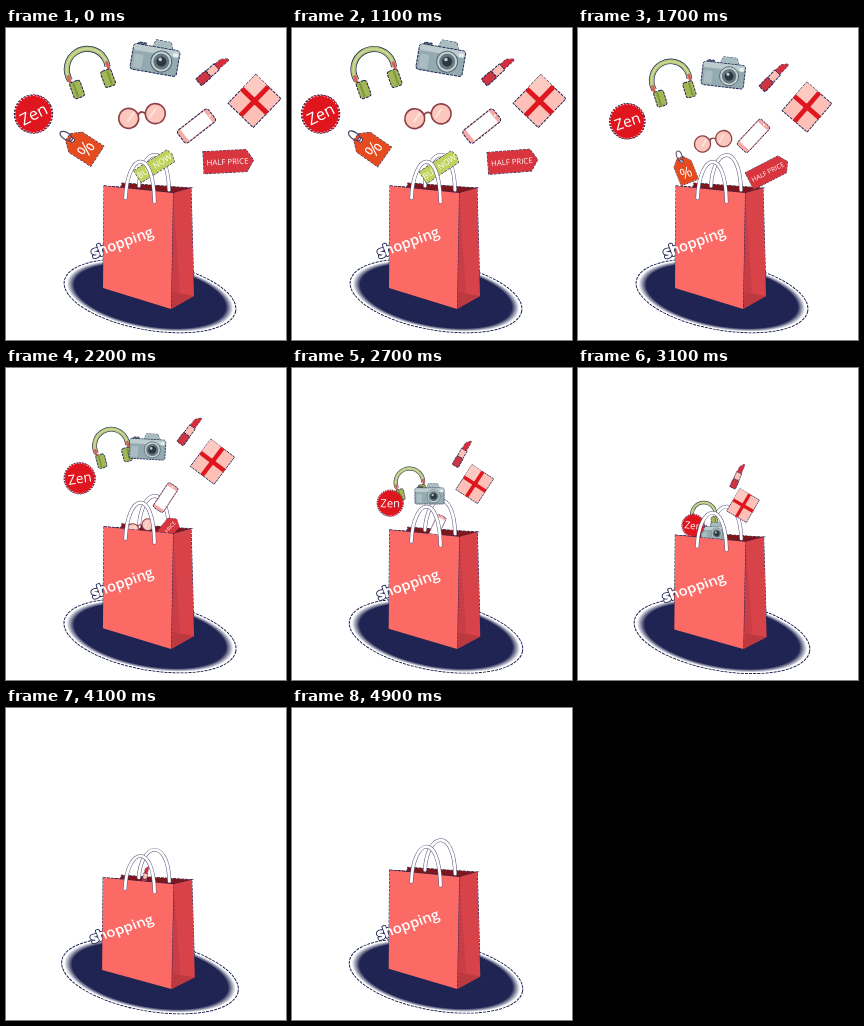
An HTML page with a canvas for the animation above (5 s loop, 280 by 312 pixels).

```html
<!DOCTYPE html>
<html lang="en">
<head>
<meta charset="utf-8">
<title>Shopping bag</title>
<style>
  html, body { margin: 0; width: 100%; height: 100%; overflow: hidden; background: #fff; }
  canvas { display: block; }
</style>
</head>
<body>
<canvas id="stage" width="280" height="312"></canvas>
<script>
const ctx = document.getElementById('stage').getContext('2d');
const FONT = '"Open Sans", "Noto Sans", sans-serif';
const NAVY = '#1f2452', RED = '#e0161f', PINK = '#fdbfb6', WHITE = '#fff';
const LOOP = 5000, HOLD = 1000, STEP = 100;
const MOUTH = { x: 134, y: 195 };

const rad = deg => deg * Math.PI / 180;
const mix = (a, b, u) => a + (b - a) * u;
const smooth = u => u * u * (3 - 2 * u);
const bump = (k, center, width) => Math.exp(-(((k - center) / width) ** 2));

function paint(fill, edge) {
  if (fill) {
    ctx.fillStyle = fill;
    ctx.fill();
  }
  if (edge) {
    ctx.strokeStyle = edge;
    ctx.stroke();
  }
}

function dashedEdge() {
  ctx.lineWidth = 1;
  ctx.setLineDash([3, 1]);
  paint(null, NAVY);
  ctx.setLineDash([]);
}

function poly(points, fill, outlined) {
  ctx.beginPath();
  points.forEach(([x, y]) => ctx.lineTo(x, y));
  ctx.closePath();
  if (outlined) dashedEdge();
  paint(fill);
}

function box(x, y, w, h, r, fill, outlined) {
  ctx.beginPath();
  ctx.roundRect(x, y, w, h, r);
  paint(fill);
  if (outlined) dashedEdge();
}

function disc(x, y, r, fill, edge, width = 1) {
  ctx.beginPath();
  ctx.arc(x, y, r, 0, 2 * Math.PI);
  ctx.lineWidth = width;
  paint(fill, edge);
}

function label(text, size, y, weight = 400) {
  ctx.font = `${weight} ${size}px ${FONT}`;
  ctx.textAlign = 'center';
  ctx.textBaseline = 'alphabetic';
  ctx.fillStyle = WHITE;
  ctx.fillText(text, 0, y);
}

function headphones() {
  ctx.lineCap = 'butt';
  for (const [color, width] of [[NAVY, 6], ['#b4c578', 4.6], ['#d3dca0', 1.4]]) {
    ctx.beginPath();
    ctx.arc(0, -5, 20.5, 0.93 * Math.PI, 2.07 * Math.PI);
    ctx.lineWidth = width;
    paint(null, color);
  }
  for (const side of [-1, 1]) {
    ctx.save();
    ctx.scale(side, 1);
    box(19, -6, 3, 10, 1, '#d4605a');
    box(11, 2, 11, 17, 2.5, '#a3b755', true);
    box(17, 3, 2, 15, 1, '#7f9440');
    ctx.restore();
  }
}

function camera() {
  box(-19, -12, 8, 5, 1, '#5d737c', true);
  poly([[-5, -9], [-2, -17], [13, -17], [16, -9]], '#a9bdc1', true);
  box(-23.5, -10, 47, 26, 3, '#93aab0', true);
  box(-23, -9.5, 46, 6, 2, '#bccccf');
  box(-21, 0, 9, 14, 1, '#a9bcc0');
  box(17, -7, 5, 4, 1, '#e4eeee');
  disc(6.5, 3.5, 10.5, '#c6d2d4', '#566870');
  disc(6.5, 3.5, 8, '#66787f');
  disc(6.5, 3.5, 5, '#2c3840');
  disc(5, 1.5, 1.8, '#b9cdd1');
}

function lipstick() {
  box(-4.5, 6, 9, 13, 1, '#cf3540', true);
  box(-4, -5, 8, 11, 0, PINK, true);
  poly([[-3, -5], [-3, -13], [2, -19], [3, -17], [3, -5]], '#d92c3a', true);
}

function gift() {
  box(-17.5, -20, 35, 40, 0, PINK, true);
  box(-17.5, -20, 17, 20, 0, '#fccac1');
  box(-2.5, -20, 5, 40, 0, RED);
  box(-17.5, -2.5, 35, 5, 0, RED);
  disc(0, 0, 3.5, RED);
}

function badge() {
  disc(0, 0, 18, RED);
  ctx.setLineDash([2, 1.4]);
  disc(0, 0, 18.3, null, RED, 2);
  disc(0, 0, 19.2, null, NAVY, 1);
  ctx.setLineDash([]);
  label('Zen', 16.5, 6, 500);
}

function priceTag() {
  poly([[-4, -18], [4, -18], [12, -9], [12, 17], [-12, 17], [-12, -9]], '#e64b1f', true);
  disc(0, -13, 2.3, WHITE, NAVY, 0.8);
  ctx.beginPath();
  ctx.ellipse(0, -20, 3.5, 7, 0, 0, 2 * Math.PI);
  ctx.lineWidth = 1.3;
  paint(null, '#55476a');
  label('%', 19, 10, 500);
}

function glasses() {
  const frame = '#8d3f47';
  ctx.beginPath();
  ctx.arc(0, 0, 4, 1.1 * Math.PI, 1.9 * Math.PI);
  ctx.lineWidth = 1.8;
  paint(null, frame);
  for (const side of [-1, 1]) {
    disc(side * 13.5, 0, 10, '#fcc7bd', frame, 1.6);
    ctx.beginPath();
    ctx.moveTo(side * 11 - 4, 3);
    ctx.lineTo(side * 11 + 4, -5);
    ctx.lineWidth = 2;
    paint(null, '#fee2dc');
  }
}

function phone() {
  box(-19.5, -8, 39, 16, 3, '#f5a9a2', true);
  box(-15, -7, 30, 14, 0, WHITE);
  disc(17, 0, 1, WHITE);
}

function halfPrice() {
  poly([[-24, -11], [19, -11], [26, 0], [19, 11], [-24, 11]], '#d8353e', true);
  label('HALF PRICE', 7.8, 3);
}

function buyNow() {
  poly([[-20, -7], [19, -7], [21, 0], [19, 7], [-20, 7]], '#bfd35c', true);
  label('BUY NOW', 8.4, 3);
}

// Resting pose, final angle and number of steps to the bag; back to front.
const items = [
  { draw: headphones, x: 83, y: 46, from: -20, to: -8, steps: 29 },
  { draw: phone, x: 190.5, y: 98, from: -38, to: -72, steps: 25 },
  { draw: glasses, x: 136, y: 88, from: -10, to: -20, steps: 17 },
  { draw: camera, x: 149.5, y: 29, from: 10, to: -3, steps: 26 },
  { draw: lipstick, x: 207, y: 42, from: 49, to: 10, steps: 38 },
  { draw: gift, x: 248.5, y: 73, from: 44, to: 25, steps: 34 },
  { draw: badge, x: 27.5, y: 86, from: -27, to: 15, steps: 30 },
  { draw: priceTag, x: 77, y: 119, from: -57, to: 10, steps: 15 },
  { draw: halfPrice, x: 221.5, y: 133.5, from: -3, to: -70, steps: 20 },
  { draw: buyNow, x: 148.5, y: 138, from: -32, to: -50, steps: 8 }
];

// Sideways motion leads and the fall lags, which bends the path.
function drawItem({ draw, x, y, from, to, steps }, k) {
  const u = Math.min(k / steps, 1), eased = smooth(u);
  const across = eased ** 0.8, down = eased * Math.sqrt(u), size = 1 - 0.52 * eased;
  if (u === 1) return;
  ctx.save();
  ctx.translate(mix(x, MOUTH.x, across), mix(y, MOUTH.y, down));
  ctx.rotate(rad(mix(from, to, across)));
  ctx.scale(size, size);
  draw();
  ctx.restore();
}

// The bag sinks under the load, springs up, then settles.
const bagHeight = k =>
  1 - 0.12 * bump(k, 27, 8.8) + 0.065 * bump(k, 34, 1.5) - 0.015 * bump(k, 39, 2);

function floorShadow(height) {
  const grow = 1 + (1 - height) * 0.3;
  ctx.save();
  ctx.translate(144, 268);
  ctx.rotate(rad(10));
  ctx.scale(grow, grow);
  ctx.beginPath();
  ctx.ellipse(0, 0, 87, 34, 0, 0, 2 * Math.PI);
  dashedEdge();
  ctx.scale(87, 34);
  const glow = ctx.createRadialGradient(0, 0, 0, 0, 0, 1);
  glow.addColorStop(0.88, NAVY);
  glow.addColorStop(0.97, WHITE);
  disc(0, 0, 0.985, glow);
  ctx.restore();
}

function inBag(height, draw) {
  ctx.save();
  ctx.translate(144, 281);
  ctx.scale(1 + (1 - height) * 0.2, height);
  ctx.translate(-144, -281);
  draw();
  ctx.restore();
}

function handle(x, y, top, width) {
  ctx.lineCap = 'round';
  for (const [color, size] of [['#59577c', 3.8], [WHITE, 2.8]]) {
    ctx.beginPath();
    ctx.moveTo(x, y);
    ctx.bezierCurveTo(x + 2, top - 9, x + width - 1, top - 15, x + width, y + 4);
    ctx.lineWidth = size;
    paint(null, color);
  }
}

function bagBack() {
  poly([[98, 158], [115, 159], [116, 155], [185, 160], [167, 166]], '#7c171d', true);
  handle(133, 158, 128, 30);
}

function slogan(outlined) {
  ctx.save();
  ctx.translate(118, 219);
  ctx.rotate(rad(-20));
  label('shopping', 14.6, 0, 600);
  if (outlined) {
    ctx.lineJoin = 'round';
    for (const [color, width] of [[NAVY, 3.2], [WHITE, 1.4]]) {
      ctx.lineWidth = width;
      ctx.strokeStyle = color;
      ctx.strokeText('shopping', 0, 0);
    }
  }
  ctx.restore();
}

function bagFront() {
  slogan(true);
  poly([[167, 165], [185, 160], [188, 268], [165, 281]], '#d8434a', true);
  poly([[167, 165], [174, 262], [165, 281]], '#c93e46');
  poly([[167, 264], [188, 268], [165, 281]], '#bd3940');
  poly([[98, 158], [167, 165], [165, 281], [97, 260]], '#fc6a66', true);
  slogan(false);
  handle(119.5, 170, 133, 29);
}

function render(k) {
  const height = bagHeight(k);
  ctx.fillStyle = WHITE;
  ctx.fillRect(0, 0, 280, 312);
  floorShadow(height);
  inBag(height, bagBack);
  items.forEach(item => drawItem(item, k));
  inBag(height, bagFront);
}

const start = performance.now();
function tick() {
  const t = (performance.now() - start) % LOOP;
  render(Math.max(0, Math.floor((t - HOLD) / STEP)));
  requestAnimationFrame(tick);
}
tick();
</script>
</body>
</html>
```
